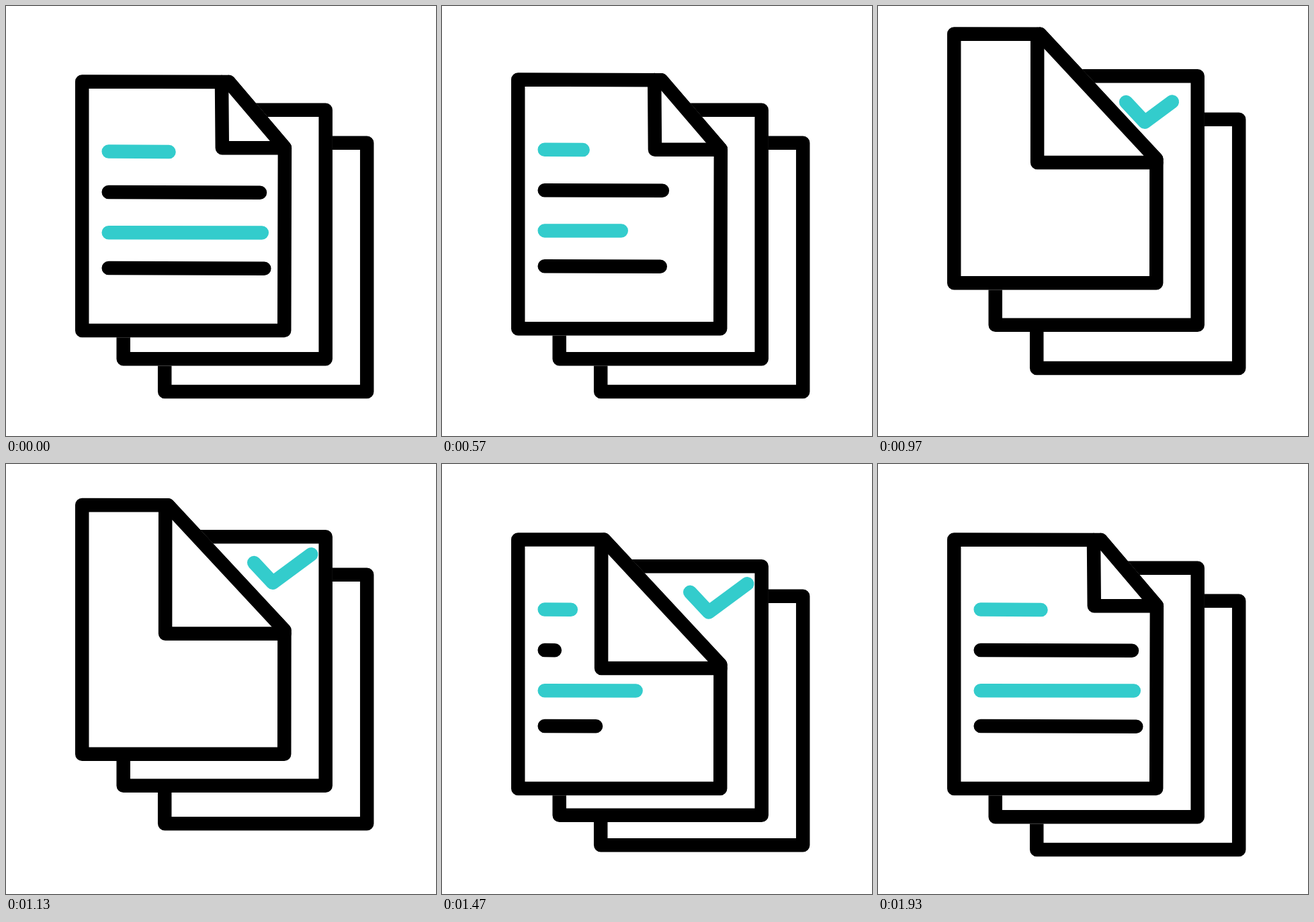
An HTML page with a canvas that plays this animation: 640 by 640 pixels, repeating every 2.5 s.

```html
<!DOCTYPE html>
<html lang="en">
<head>
<meta charset="utf-8">
<title>Documents</title>
<style>
  html, body { margin: 0; width: 100%; height: 100%; overflow: hidden; background: #fff; }
  canvas { display: block; width: 100vmin; height: 100vmin; }
</style>
</head>
<body>
<canvas id="stage" width="640" height="640"></canvas>
<script>
const ctx = document.getElementById('stage').getContext('2d');
const LOOP = 2500, STEP = 100 / 3;
const INK = '#000', TEAL = '#33cccc', PAPER = '#fff';
const STROKE = 20.5;

// Symmetric ease-in-out between two ticks; k is the handle length.
function ease(n, from, to, k = 0.42) {
  const x = (n - from) / (to - from);
  if (x <= 0) return 0;
  if (x >= 1) return 1;
  let lo = 0, hi = 1;
  for (let i = 0; i < 24; i++) {
    const s = (lo + hi) / 2, r = 1 - s;
    const at = 3 * k * s * r * r + 3 * (1 - k) * s * s * r + s * s * s;
    if (at < x) lo = s; else hi = s;
  }
  return lo * lo * (3 - 2 * lo);
}

const mix = (a, b, p) => a + (b - a) * p;

// Rise and fall of each sheet: height, then start and end of each move.
const lift = (n, h, a, b, c, d) => -h * (ease(n, a, b) - ease(n, c, d));

function trace(points, closed) {
  ctx.beginPath();
  points.forEach(([x, y]) => ctx.lineTo(x, y));
  if (closed) ctx.closePath();
}

function stroke(color) {
  ctx.strokeStyle = color;
  ctx.stroke();
}

function sheet(points) {
  trace(points, true);
  ctx.fillStyle = PAPER;
  ctx.fill();
  stroke(PAPER);
  stroke(INK);
}

function box(x, y, w, h) {
  sheet([[x, y], [x + w, y], [x + w, y + h], [x, y + h]]);
}

// Draws the part of a polyline between the fractions a and b of its length.
function partial(points, a, b, color) {
  if (b - a < 0.005) return;
  const lens = points.slice(1).map((p, i) => Math.hypot(p[0] - points[i][0], p[1] - points[i][1]));
  const total = lens.reduce((s, l) => s + l, 0);
  const out = [];
  let run = 0;
  lens.forEach((len, i) => {
    const p = points[i], q = points[i + 1];
    const u = Math.max(0, (a * total - run) / len);
    const v = Math.min(1, (b * total - run) / len);
    if (u < v) {
      for (const f of [u, v]) out.push([mix(p[0], q[0], f), mix(p[1], q[1], f)]);
    }
    run += len;
  });
  trace(out);
  stroke(color);
}

const rows = [
  { y: 216.6, end: 242.5, drop: 0.5, color: TEAL, out: [8.4, 29.4, 1 / 3], in: 39.3 },
  { y: 277.1, end: 378, drop: 0.7, color: INK, out: [11.6, 29.3, 1 / 3], in: 42.15 },
  { y: 337.2, end: 380.8, drop: 0.4, color: TEAL, out: [5, 29, 0.42], in: 38.35 },
  { y: 390, end: 384.3, drop: 0.8, color: INK, out: [10.2, 30.7, 1 / 3], in: 39.95 }
];

function drawRow(row, n) {
  const shown = 1 - ease(n, ...row.out) + ease(n, row.in, row.in + 10.16);
  if (shown < 0.02) return;
  const start = 152.7;
  trace([[start, row.y], [mix(start, row.end, shown), row.y + row.drop * shown]]);
  stroke(row.color);
}

function shifted(dy, draw) {
  ctx.save();
  ctx.translate(0, dy);
  draw();
  ctx.restore();
}

function drawFront(n) {
  const fold = ease(n, 15.3, 25.4) - ease(n, 48, 58);
  const tip = [mix(331.5, 241, fold), mix(113, 112.6, fold)];
  const corner = [mix(414.9, 414.4, fold), mix(211, 298.8, fold)];
  const flapY = mix(211.2, 303.9, fold);
  const flap = [
    [mix(321, 237.2, fold), 112.9],
    [mix(321.8, 237.1, fold), flapY],
    [414.5, flapY]
  ];
  sheet([[113.2, 112.4], tip, corner, [414.2, 483], [113.2, 483]]);
  rows.forEach(row => drawRow(row, n));
  trace([...flap, corner, tip], true);
  ctx.fillStyle = PAPER;
  ctx.fill();
  trace(flap);
  stroke(INK);
  trace([tip, corner]);
  stroke(INK);
}

function draw(n) {
  ctx.fillStyle = PAPER;
  ctx.fillRect(0, 0, 640, 640);
  ctx.lineWidth = STROKE;
  ctx.lineCap = ctx.lineJoin = 'round';

  shifted(lift(n, 40.3, 19.5, 32.2, 31.8, 48.9), () => box(236.2, 203.7, 301, 370.4));

  shifted(lift(n, 51.5, 17.6, 30.3, 30.5, 46.5), () => {
    box(174.7, 154.8, 301, 370.5);
    const tick = [[369.2, 193.4], [397, 223.1], [454.2, 180.9]];
    partial(tick, ease(n, 47.5, 57.5), ease(n, 21.85, 32), TEAL);
  });

  shifted(lift(n, 71, 15.2, 28, 28.5, 43.6), () => drawFront(n));
}

let last = -1;
const origin = performance.now();

function loop() {
  const t = (performance.now() - origin) % LOOP;
  const n = Math.floor((t + 4) / STEP) % 75;
  if (n !== last) draw(last = n);
  requestAnimationFrame(loop);
}
loop();
</script>
</body>
</html>
```
